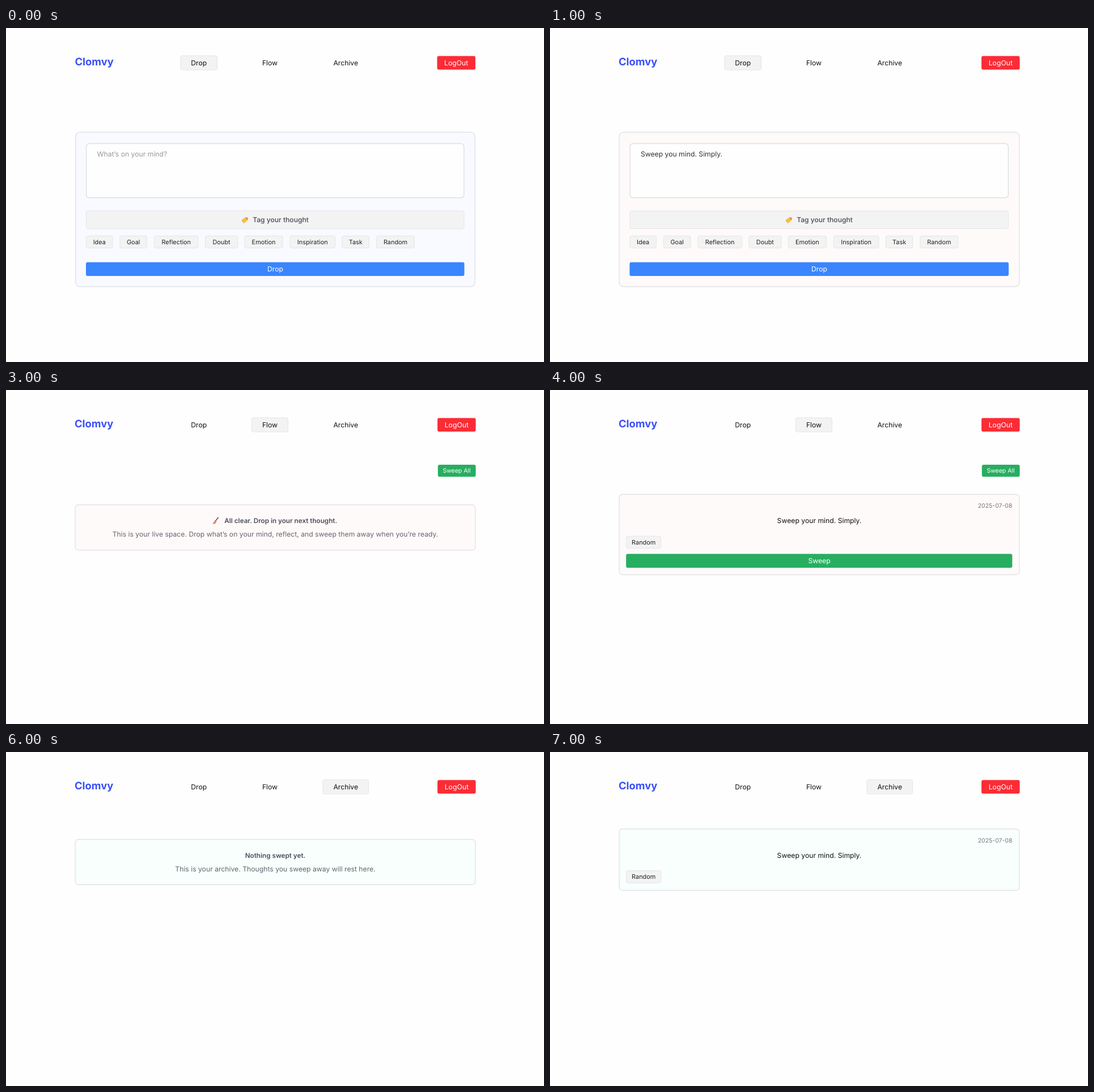
Animation of 949 by 590 pixels, one loop 8 s. Source, as an HTML page:

```html
<!DOCTYPE html>
<html lang="en">
<head>
<meta charset="utf-8">
<title>Thought drop</title>
<style>
  html, body { margin: 0; width: 100%; height: 100%; overflow: hidden; background: #fefefe; }
  svg { display: block; width: 949px; height: 590px; font-family: Inter, Roboto, sans-serif; text-rendering: geometricPrecision; }
  .scene { animation: show 8s step-end infinite; }
  @keyframes show {
    0% { visibility: visible; }
    12.5%, 100% { visibility: hidden; }
  }
</style>
</head>
<body>
<svg id="stage" viewBox="0 0 949 590"></svg>
<script>
const GREY = '#f3f3f4', EDGE = '#e4e5e8', LINE = '#dddfe4';
const GREEN = '#27ae60', BLUE = '#3a86ff', RED = '#fb2c36';
const PINK = '#fffafa', LILAC = '#f9faff', MINT = '#f8fffd';

// Box given by its outer edges; the border lies inside them.
function box(left, top, right, bottom, fill, { edge = 'none', radius = 3, line = 1 } = {}) {
  const inset = edge === 'none' ? 0 : line / 2;
  return `<rect x="${left + inset}" y="${top + inset}" width="${right - left - 2 * inset}"
    height="${bottom - top - 2 * inset}" rx="${radius}" fill="${fill}" stroke="${edge}" stroke-width="${line}"/>`;
}

function label(text, x, y, { size = 12.2, fill = '#111', weight = 400, anchor = 'middle' } = {}) {
  return `<text x="${x}" y="${y}" font-size="${size}" font-weight="${weight}" fill="${fill}" text-anchor="${anchor}">${text}</text>`;
}

const chip = (text, left, right, top, on) =>
  box(left, top, right, top + 22.5, on ? '#000' : GREY, { edge: on ? '#000' : EDGE }) +
  label(text, (left + right) / 2, top + 15, { size: 10.9, fill: on ? '#fff' : '#222' });

const card = (top, bottom, fill, spread = 0.6, radius = 6) =>
  box(122 - spread, top, 828 + spread, bottom, fill, { edge: LINE, radius, line: 1.25 });

const TABS = [['Drop', 307.5, 373], ['Flow', 433, 498], ['Archive', 558.5, 640]];

function header(active, spread = 0.6) {
  const tabs = TABS.map(([name, left, right]) =>
    (name === active ? box(left, 48.5, right, 74.5, GREY, { edge: EDGE }) : '') +
    label(name, (left + right) / 2, 66));
  return label('Clomvy', 121.5 - spread, 66, { size: 18.4, fill: '#3a50f7', weight: 700, anchor: 'start' }) +
    tabs.join('') +
    box(760.5 + spread, 49.5, 828 + spread, 73.5, RED) +
    label('LogOut', 794.2 + spread, 66, { fill: '#fff' });
}

const tagIcon = `<g transform="translate(422 338.7) rotate(-38)">
  <path d="M-5.8-3H2.8L5.8 0 2.8 3H-5.8Z" fill="#fbbf3f" stroke="#f0a02c" stroke-width=".6" stroke-linejoin="round"/>
  <circle cx="3.4" r="1" fill="#8b5a3c"/></g>`;

const broomIcon = `<path d="M374.3 225.2 369.8 231" stroke="#6b4a78" stroke-width="1.5" stroke-linecap="round"/>
  <path d="M368.6 229.8 371.4 232Q370.5 235.8 367.6 236.8L364 236Q366.8 234 368.6 229.8Z" fill="#f0875a"/>`;

const TAGS = [['Idea', 141, 188.5], ['Goal', 200.5, 249], ['Reflection', 261, 339.5], ['Doubt', 351, 409],
  ['Emotion', 420.5, 488.5], ['Inspiration', 500.5, 581], ['Task', 592.5, 641], ['Random', 653, 721]];

function dropPage({ text = '', tag, fill = PINK, spread = 0.6 } = {}) {
  const left = 141 - spread, right = 808.5 + spread;
  return header('Drop', spread) + card(183.5, 457.5, fill, spread, 8) +
    box(left, 203.5, right, 300.5, '#fefefe', { edge: '#d9dce2', radius: 5.5, line: 1.25 }) +
    label(text || 'What’s on your mind?', 160.5 - spread, 227, { fill: text ? '#333' : '#999', anchor: 'start' }) +
    box(left, 322.5, right, 355, GREY, { edge: EDGE }) + tagIcon +
    label('Tag your thought', 484.5, 343, { size: 12.1, fill: '#4b4b52', weight: 500 }) +
    TAGS.map(([name, a, b]) => chip(name, a - spread, b - spread, 366.7, name === tag)).join('') +
    box(left, 413.8, right, 438, BLUE) + label('Drop', 475, 430, { fill: '#fff' });
}

const thought = (top, bottom, fill) => card(top, bottom, fill) +
  label('2025-07-08', 815.5, top + 24.5, { size: 10.5, fill: '#777780', anchor: 'end' }) +
  label('Sweep your mind. Simply.', 475, top + 51.3) +
  chip('Random', 134.2, 196.2, top + 74);

const notice = (top, fill, title, hint, titleX) => card(top, top + 81.3, fill) +
  label(title, titleX, top + 32.8, { size: 11.7, fill: '#4a4d57', weight: 600 }) +
  label(hint, 475, top + 57, { fill: '#63656d' });

const flowPage = content => header('Flow') +
  box(761.8, 132, 828.6, 153.3, GREEN) +
  label('Sweep All', 795, 146.4, { size: 10.5, fill: '#fff' }) + content;

const clearFlow = flowPage(notice(202.2, PINK, 'All clear. Drop in your next thought.',
  'This is your live space. Drop what’s on your mind, reflect, and sweep them away when you’re ready.', 484.7) + broomIcon);

const fullFlow = flowPage(thought(183.7, 327, PINK) +
  box(134.2, 289.6, 815.4, 314, GREEN) + label('Sweep', 475, 306, { fill: '#fff' }));

const typed = 'Sweep you mind. Simply.';
const scenes = [
  dropPage({ fill: LILAC, spread: 0 }),
  dropPage({ text: typed }),
  dropPage({ text: typed, tag: 'Random' }),
  clearFlow,
  fullFlow,
  clearFlow,
  header('Archive') + notice(153.7, MINT, 'Nothing swept yet.',
    'This is your archive. Thoughts you sweep away will rest here.', 475),
  header('Archive') + thought(135.2, 245, MINT),
];

document.getElementById('stage').innerHTML = scenes.map((content, i) =>
  `<g class="scene" style="animation-delay:${i - scenes.length}s">${content}</g>`).join('');
</script>
</body>
</html>
```
